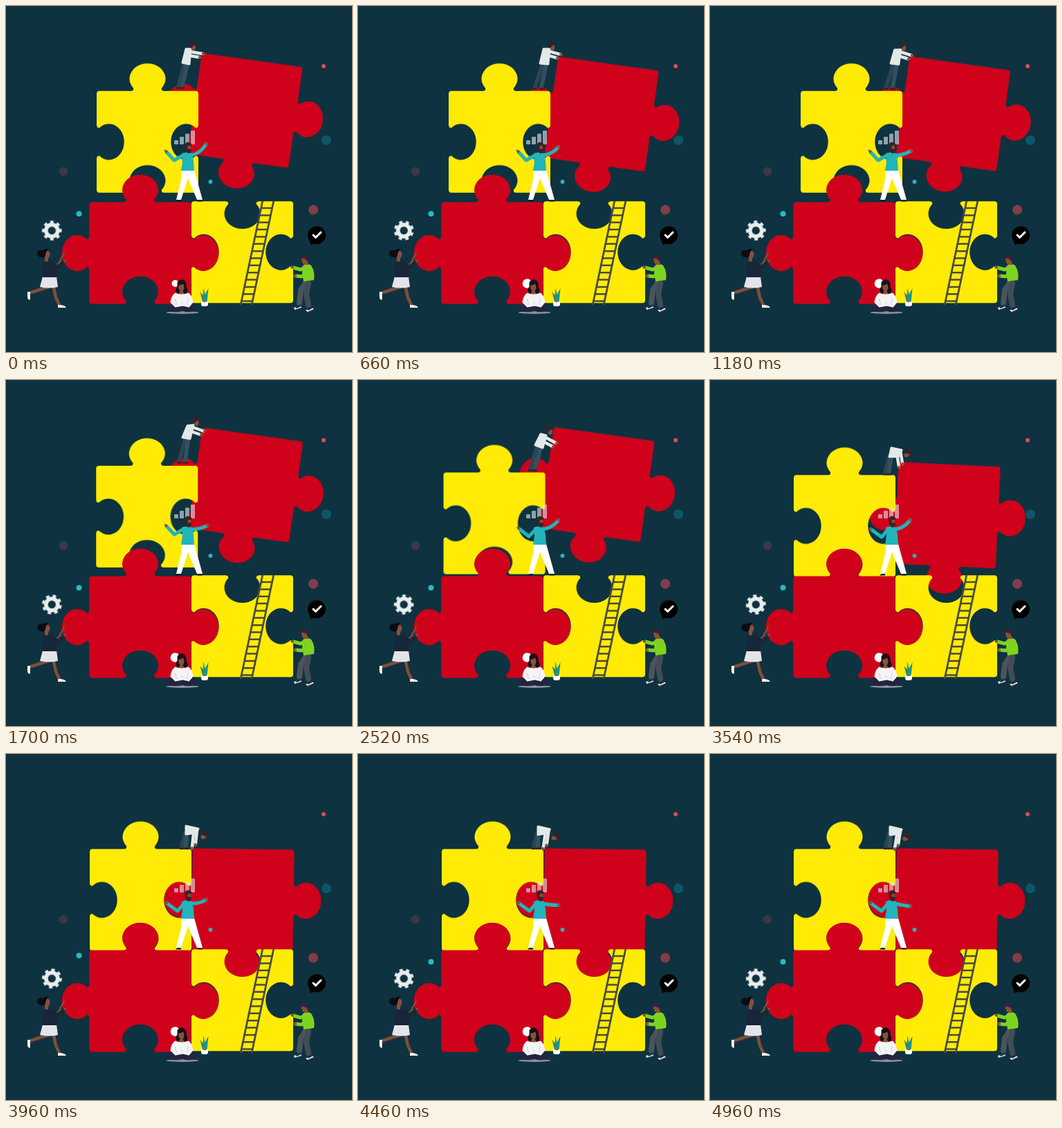
An HTML page without scripts that plays this animation: 500x500 px, repeating every 4.98 s.

```html
<!DOCTYPE html>
<html lang="en">
<head>
<meta charset="utf-8">
<title>Teamwork puzzle</title>
<style>
html, body { margin: 0; width: 100%; height: 100%; overflow: hidden; background: #0e3240; }
svg { display: block; width: 100%; height: 100%; }
.red { fill: #d0021b; }
.yellow { fill: #ffeb06; }
.limb { fill: none; stroke-linecap: round; stroke-linejoin: round; }
.skin { stroke: #7f4f38; }
.skin-fill { fill: #8a4f39; }
.move { animation: 4.98s ease-in-out infinite; }

.leaning { animation-name: leaning; }
@keyframes leaning {
  0%, 39.2%, 52.2% { transform: translate(345.5px, 151px) rotate(8deg); }
  17.07% { transform: translate(352.5px, 156.8px) rotate(8deg); }
  59.24% { transform: translate(344.7px, 152px) rotate(8.2deg); animation-timing-function: cubic-bezier(.37, 0, .63, 1); }
  77.3%, 100% { transform: translate(342px, 210.8px) rotate(.8deg); }
}
.lowered { animation-name: lowered; }
@keyframes lowered {
  0%, 28.1% { transform: translate(131px, 122.8px); animation-timing-function: cubic-bezier(.37, 0, .63, 1); }
  62.2%, 100% { transform: translate(121px, 137.3px); }
}
.gear { animation: turn 4.98s linear infinite; }
@keyframes turn { to { transform: rotate(180deg); } }
.thought { animation-name: grow; }
@keyframes grow { 0% { r: 5px; } 12%, 100% { r: 6.8px; } }
.bob { animation-name: bob; }
@keyframes bob {
  0%, 70%, 89%, 100% { transform: none; }
  79.5% { transform: translateY(-9px); }
}

.reach { animation-name: reach; }
@keyframes reach {
  0%, 62.2% { d: path("M266 216Q280 214 289 200"); }
  31.1% { d: path("M266 216Q280 216 290 211"); }
  96%, 100% { d: path("M266 216Q280 219 289 220"); }
}
.hold { animation-name: hold; }
@keyframes hold {
  0%, 28.1% { d: path("M257 215L243 223L232 211"); }
  62.2%, 100% { d: path("M258 215L248 227L233 216"); }
}

/* climber on the upper edge */
.head { animation-name: head; }
@keyframes head {
  0% { transform: translate(268.5px, 59px); }
  17.07% { transform: translate(280px, 59px); }
  34.1% { transform: translate(273.5px, 60.5px) rotate(8deg); animation-timing-function: cubic-bezier(.4, 0, .8, .8); }
  50.6% { transform: translate(276px, 73.5px) rotate(8deg); animation-timing-function: ease-out; }
  64% { transform: translate(279px, 78px) rotate(8deg); }
  75.3% { transform: translate(286px, 117px) rotate(70deg); }
  100% { transform: translate(283px, 120px) rotate(75deg); }
}
.torso { animation-name: torso; }
@keyframes torso {
  0% { d: path("M260 62L267 62L265 84L255 82Z"); }
  17.07% { d: path("M269 62L278 62L276 84L264 83Z"); }
  34.1% { d: path("M262 66L271 65L266 85L255 83Z"); animation-timing-function: cubic-bezier(.4, 0, .8, .8); }
  50.6% { d: path("M264 78L272 80L267 98L256 94Z"); animation-timing-function: ease-out; }
  64% { d: path("M267 83L275 84L266 103L257 99Z"); }
  75.3% { d: path("M260 104L278 108L275 114L260 116Z"); }
  100% { d: path("M260 105L277 109L274 115L260 117Z"); }
}
.arm { animation-name: arm; }
@keyframes arm {
  0% { d: path("M266 66L284 69"); }
  17.07% { d: path("M276 65L293 70"); }
  34.1% { d: path("M269 68L286 74"); animation-timing-function: cubic-bezier(.4, 0, .8, .8); }
  50.6% { d: path("M271 83L286 91"); animation-timing-function: ease-out; }
  64% { d: path("M274 87L288 96"); }
  75.3% { d: path("M276 111L274 130"); }
  100% { d: path("M275 112L272 131"); }
}
.back-leg { animation-name: back-leg; }
@keyframes back-leg {
  0% { d: path("M258 84L249 117"); }
  17.07% { d: path("M268 84L256 118"); }
  34.1% { d: path("M259 85L250 118"); animation-timing-function: cubic-bezier(.4, 0, .8, .8); }
  50.6% { d: path("M259 97L249 129"); animation-timing-function: ease-out; }
  64% { d: path("M260 101L250 133"); }
  75.3%, 100% { d: path("M259 114L254 135"); }
}
.front-leg { animation-name: front-leg; }
@keyframes front-leg {
  0% { d: path("M262 85L254 117"); }
  17.07% { d: path("M273 84L266 118"); }
  34.1% { d: path("M263 86L259 118"); animation-timing-function: cubic-bezier(.4, 0, .8, .8); }
  50.6% { d: path("M264 98L255 129"); animation-timing-function: ease-out; }
  64% { d: path("M264 103L254 133"); }
  75.3%, 100% { d: path("M261 115L260 135"); }
}
</style>
</head>
<body>
<svg viewBox="0 0 500 500">
  <defs>
    <marker id="hand" markerUnits="userSpaceOnUse" markerWidth="8" markerHeight="6" refX="1" refY="3" orient="auto">
      <path class="skin-fill" d="M0 1.2L4 1.5Q6 3 4 4.500L0 4.800Z"/>
    </marker>
    <marker id="shoe" markerUnits="userSpaceOnUse" markerWidth="9" markerHeight="5" refX="4" refY="1">
      <path fill="#3a2530" d="M1 1H6Q9 2 9 4H1Z"/>
    </marker>
  </defs>

  <rect width="500" height="500" fill="#0e3240"/>
  <circle cx="459" cy="87" r="3" fill="#dc4a62"/>
  <circle cx="463" cy="194" r="7" fill="#0e5666"/>
  <circle cx="83" cy="239" r="6.300" fill="#3c3842"/>
  <circle class="move bob" cx="105.500" cy="300.300" r="4" fill="#24bcc3"/>
  <circle cx="444" cy="294.500" r="7" fill="#843c4b"/>

  <!-- puzzle pieces, each edge clockwise from the top left corner -->
  <g class="move leaning red">
    <path transform="translate(-73.500 -73.500)" d="M4 0H143a4 4 0 0 1 4 4
      v45.5c0 4 4 5 6 2a22 26 0 1 1 0 44c-2-3-6-2-6 2v45.5a4 4 0 0 1-4 4
      h-45.5c-4 0-5 4-2 6a26 22 0 1 1-44 0c3-2 2-6-2-6h-45.5a4 4 0 0 1-4-4
      v-45.5c0-4-4-5-6-2a22 26 0 1 1 0-44c2 3 6 2 6-2v-45.5a4 4 0 0 1 4-4z"/>
  </g>
  <g class="move lowered yellow">
    <path d="M4 0h45.5c4 0 5-4 2-6a26 22 0 1 1 44 0c-3 2-2 6 2 6h45.5a4 4 0 0 1 4 4
      v45.5c0 4-4 5-6 2a22 26 0 1 0 0 44c2-3 6-2 6 2v45.5a4 4 0 0 1-4 4
      h-45.5c-4 0-5-4-2-6a26 22 0 1 0-44 0c3 2 2 6-2 6h-45.5a4 4 0 0 1-4-4
      v-45.5c0-4 4-5 6-2a22 26 0 1 0 0-44c-2 3-6 2-6-2v-45.5a4 4 0 0 1 4-4z"/>
  </g>
  <path class="yellow" transform="translate(268 282.300)" d="M4 0h45.5c4 0 5 4 2 6a26 22 0 1 0 44 0c-3-2-2-6 2-6h45.5a4 4 0 0 1 4 4
      v45.5c0 4-4 5-6 2a22 26 0 1 0 0 44c2-3 6-2 6 2v45.5a4 4 0 0 1-4 4
      H4a4 4 0 0 1-4-4
      v-45.5c0-4 4-5 6-2a22 26 0 1 0 0-44c-2 3-6 2-6-2v-45.5a4 4 0 0 1 4-4z"/>
  <path class="red" transform="translate(120.500 283.500)" d="M4 0h45.5c4 0 5-4 2-6a26 22 0 1 1 44 0c-3 2-2 6 2 6h45.5a4 4 0 0 1 4 4
      v45.5c0 4 4 5 6 2a22 26 0 1 1 0 44c-2-3-6-2-6 2v45.5a4 4 0 0 1-4 4
      h-45.5c-4 0-5-4-2-6a26 22 0 1 0-44 0c3 2 2 6-2 6h-45.5a4 4 0 0 1-4-4
      v-45.5c0-4-4-5-6-2a22 26 0 1 1 0-44c2 3 6 2 6-2v-45.5a4 4 0 0 1 4-4z"/>
  <circle cx="295.500" cy="254" r="3" fill="#2fb0b4"/>

  <g transform="translate(370.700 282) skewX(-11.900)" fill="none" stroke="#4a4a3c">
    <path stroke-width="16" stroke-dasharray="2.500 7.850" stroke-dashoffset="-.8" d="M8 8V146"/>
    <path stroke-width="2.800" d="M0 0V150M16 0V150"/>
  </g>

  <g fill="#dfe6ec" opacity=".62">
    <rect x="243" y="194" width="6" height="6" rx="1"/>
    <rect x="251" y="189" width="6" height="11" rx="1"/>
    <rect x="259" y="184.500" width="6" height="15.500" rx="1"/>
    <rect x="267" y="180" width="6" height="20" rx="1"/>
  </g>

  <g transform="translate(66.300 324.500)">
    <g class="gear" fill="none" stroke="#e8edee">
      <circle r="8.500" stroke-width="5.600"/>
      <circle r="12.300" stroke-width="4" pathLength="80" stroke-dasharray="5 5" stroke-dashoffset="2.500"/>
    </g>
  </g>

  <circle cx="449" cy="331.300" r="13"/>
  <path d="M437 334L440 345L449 343Z"/>
  <path class="limb" stroke="#fff" stroke-width="3" stroke-linecap="butt" d="M444 331L447.500 334.500L455 327"/>

  <!-- climber -->
  <g class="limb">
    <path class="move back-leg" stroke="#2c4454" stroke-width="6" marker-end="url(#shoe)" d="M258 84L249 117"/>
    <path class="move front-leg" stroke="#335062" stroke-width="6" marker-end="url(#shoe)" d="M262 85L254 117"/>
    <path class="move torso" fill="#e3e9e6" stroke="#e3e9e6" stroke-width="3" d="M260 62L267 62L265 84L255 82Z"/>
    <g stroke="#e3e9e6" stroke-width="4.500">
      <path class="move arm" marker-end="url(#hand)" d="M266 66L284 69"/>
      <path class="move arm" transform="translate(-5 5)" marker-end="url(#hand)" d="M266 66L284 69"/>
    </g>
  </g>
  <g class="move head">
    <ellipse class="skin-fill" cx="2" cy="1" rx="3.200" ry="4.200"/>
    <path fill="#33212c" d="M-2 2Q-6-3-7-7Q-3-5 0-7Q5-8 6-3Q2-3 1 0Z"/>
  </g>

  <!-- presenter -->
  <path fill="#122229" d="M245 282.500Q247 279 253 279.500V282.500ZM276 282.500Q280 278 284.500 282.500Z"/>
  <path fill="#fff" d="M254 237H272L284 280H276L263 249L253 280H246L253 251Z"/>
  <g class="limb" stroke="#21b5ba" stroke-width="5">
    <path class="move hold" marker-end="url(#hand)" d="M257 215L243 223L232 211"/>
    <path class="move reach" marker-end="url(#hand)" d="M266 216Q280 214 289 200"/>
  </g>
  <path fill="#21b5ba" d="M254 213Q262 210 269 213L271 224L272 238H253L255 225Z"/>
  <path class="skin-fill" d="M260 200H267V209Q266 213 261 212Z"/>
  <path fill="#3b2129" d="M258 201Q260 196 265 197Q269 198 268 202H263L262 206L268 207Q268 213 263 213L259 208Z"/>

  <!-- runner -->
  <g class="limb skin" stroke-width="4.500">
    <path d="M66 377L82 370L86 368" stroke-width="3"/>
    <path d="M76 372L84 357" stroke-width="2.500"/>
    <path d="M61 406L36 414"/>
    <path d="M69 407L72 421L77 432"/>
  </g>
  <path fill="#eef0f1" d="M31 413L35 413L35 424Q32 426 31 421ZM75 432H80Q86 433 87 436H75Z"/>
  <path fill="#e3e4ea" d="M53 391H73L75 406Q63 409 49 406Z"/>
  <path fill="#17263a" d="M54 370Q61 365 68 369L74 374L83 368L85 372L74 382L73 392H53Z"/>
  <ellipse class="skin-fill" cx="59.500" cy="359" rx="4" ry="5.500"/>
  <path class="skin-fill" d="M56 362H61V369H56Z"/>
  <path fill="#0a0c12" d="M61 352Q57 349 53 353Q47 351 45 356Q45 362 50 363Q55 365 57 361Q57 355 61 352Z"/>

  <!-- helper on the right -->
  <g class="limb" stroke-width="8" stroke="#4b545c">
    <path d="M433 400L426 411L424 429"/>
    <path d="M437 400L434 416L437 432" stroke="#434c55"/>
  </g>
  <path fill="#e4e8ea" d="M416 436L426 432L427 436L417 439ZM433 440L442 435L445 438L436 442Z"/>
  <path fill="#2a3038" d="M418 435L426 431L427 434L420 437ZM435 438L441 434L444 436L437 440Z"/>
  <g class="limb" stroke="#7ed321" stroke-width="5">
    <path marker-end="url(#hand)" d="M433 377L426 381L415 378"/>
    <path marker-end="url(#hand)" d="M434 386L427 391L419 390"/>
  </g>
  <path fill="#7ed321" d="M429 375Q436 371 441 375Q447 384 445 396L430 398L428 386Z"/>
  <path class="skin-fill" d="M427 364H435L437 374H432Q427 373 427 364Z"/>
  <path fill="#3a2230" d="M425 364Q427 359 433 361Q438 363 436 370L433 366Z"/>

  <!-- seated woman and plant -->
  <circle class="move thought" cx="244.500" cy="401" r="6.500" fill="#fff"/>
  <ellipse cx="255" cy="443" rx="23.500" ry="1.900" fill="#84929a"/>
  <path fill="#25243f" d="M240 430Q232 434 232 440Q243 444 255 441Q266 444 273 440Q273 434 268 429Z"/>
  <g transform="translate(-.5 -1.500)">
    <path fill="#14131b" d="M248 401Q251 396 256 397Q262 399 261 407Q264 412 262 417H248Q244 412 248 407Z"/>
    <path class="skin-fill" d="M250 405Q254 405 257 403L258 409Q257 413 256 413L258 418H250L252 413Q249 410 250 405Z"/>
    <path fill="#f4f4f7" d="M245 416Q254 420 264 416Q270 420 271 430L265 437L256 435L245 437L238 430Q239 420 245 416Z"/>
    <path class="limb" stroke="#c9ccd6" stroke-width="1" d="M245 425L247 433M264 425L262 433M254 430L256 430"/>
  </g>
  <path fill="#1f8580" d="M284 427L280.500 413L284.500 418L285.500 407L287.500 417L292.500 408L290.500 427Z"/>
  <path class="limb" stroke="#35a58a" stroke-width="1" d="M286.500 427L285.500 411M288.500 425L290.500 414"/>
  <path fill="#fff" d="M282 427Q287 425 292 427V432Q291 434 289 434H285Q282 434 282 431Z"/>
  <path fill="#252a33" d="M283 427Q287 425.500 291 427Q287 428.500 283 427Z"/>
</svg>
</body>
</html>
```
